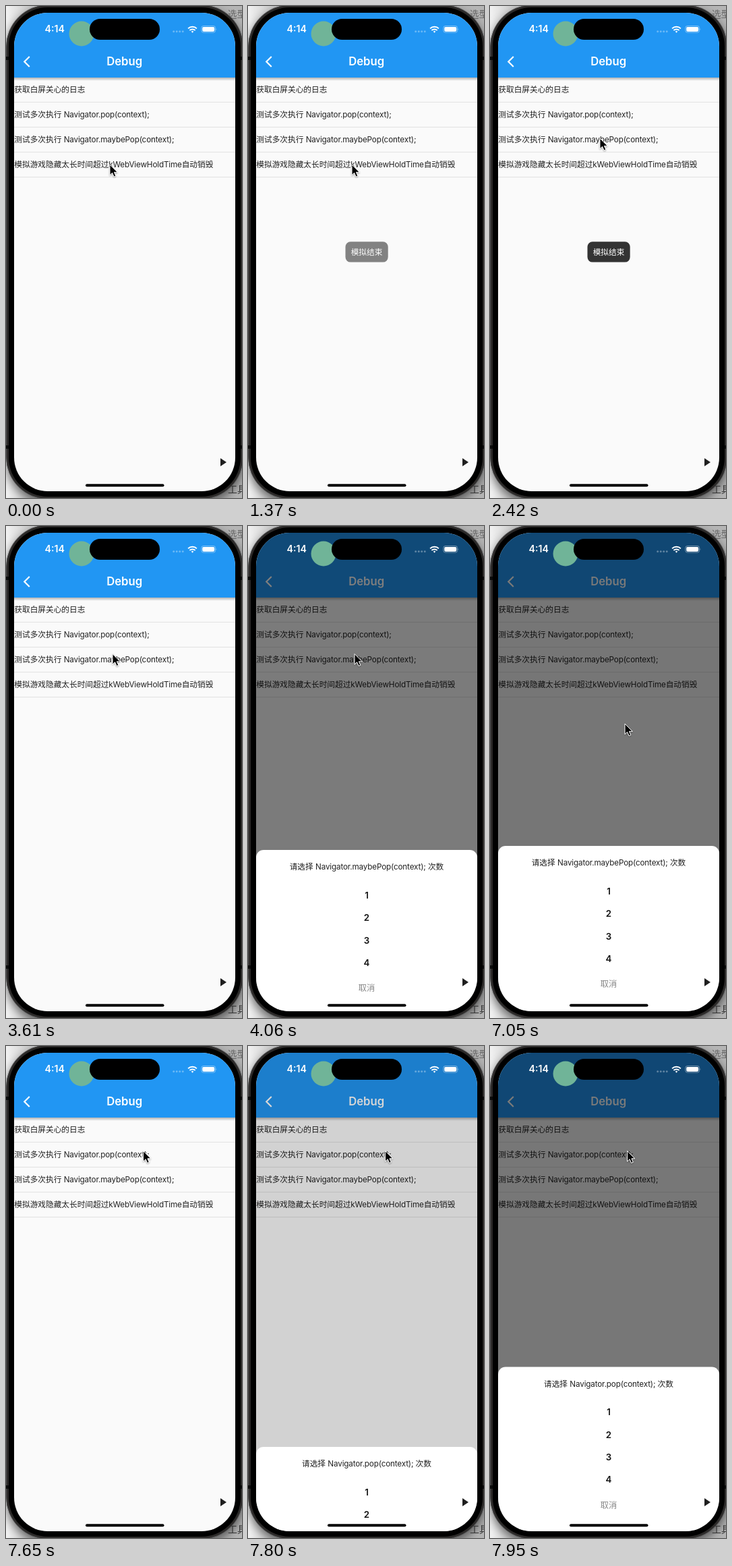
An HTML page for the animation above (8000 ms loop, 350 px wide and 729 px high).

```html
<!DOCTYPE html>
<html lang="zh-CN">
<head>
<meta charset="utf-8">
<title>Debug screen</title>
<style>
  html, body { margin: 0; width: 100%; height: 100%; overflow: hidden; background: #bbb; }
  svg { display: block; width: 350px; height: 729px; }
  text { font: 11.68px Inter, "Noto Sans CJK SC", "Noto Sans CJK", sans-serif; fill: #222; white-space: pre; }
  .latin { letter-spacing: -0.15px; }
  .mid { text-anchor: middle; }
  .title { font-size: 16.7px; font-weight: 600; fill: #fff; }
  .clock { font-size: 14.2px; font-weight: 600; fill: #fff; }
  .choice { font-size: 13.3px; font-weight: 600; fill: #111; }
  .cancel { font-size: 12.3px; fill: #888; }
</style>
</head>
<body>
<svg viewBox="0 0 350 729">
  <defs>
    <clipPath id="screen"><rect x="12" y="10" width="328" height="709" rx="50"/></clipPath>
    <linearGradient id="desk">
      <stop offset="0" stop-color="#f2f2f2"/>
      <stop offset=".12" stop-color="#c4c4c4"/>
      <stop offset="1" stop-color="#b4b4b4"/>
    </linearGradient>
    <linearGradient id="edge" x2="0" y2="1">
      <stop offset="0" stop-opacity=".28"/>
      <stop offset="1" stop-opacity="0"/>
    </linearGradient>
    <filter id="blur" x="-10%" y="-10%" width="120%" height="120%"><feGaussianBlur stdDeviation="7"/></filter>
    <filter id="soft" x="-50%" y="-50%" width="200%" height="200%">
      <feDropShadow dx="0" dy="1" stdDeviation=".8" flood-opacity=".4"/>
    </filter>
  </defs>

  <!-- desktop and phone body -->
  <rect width="350" height="729" fill="url(#desk)"/>
  <rect y="4" width="352" height="733" rx="62" opacity=".5" filter="url(#blur)"/>
  <text x="329" y="16.5" style="font-size:13.5px;fill:#666">选型</text>
  <text x="329" y="721" style="font-size:14px;fill:#333">工具</text>
  <rect x=".5" y="-1.5" width="351" height="732" rx="62" fill="#2c2a29" stroke="#4e4e4f"/>
  <path d="M0 77.500h4m344 0h4M0 653.500h4m344 0h4" stroke="#0b0b0b" stroke-width="5"/>
  <rect x="4" y="2" width="344" height="725" rx="58"/>

  <g clip-path="url(#screen)">
    <rect x="12" y="10" width="328" height="709" fill="#fafafa"/>
    <g id="rows"></g>
    <rect x="12" y="106" width="328" height="5" fill="url(#edge)"/>
    <rect x="12" y="10" width="328" height="96" fill="#2196f3"/>
    <path d="M34.800 75l-7.500 7.500 7.500 7.500" fill="none" stroke="#fff" stroke-width="2.200"/>
    <text class="title mid" x="175.700" y="88.300">Debug</text>
    <rect id="dim" x="12" y="10" width="328" height="709"/>
    <g id="sheet">
      <rect x="12" y="470" width="328" height="270" rx="11" fill="#fff"/>
      <text id="prompt" class="mid" x="176" y="499.400"></text>
      <g id="choices"></g>
      <text class="cancel mid" x="176" y="679">取消</text>
    </g>
    <g id="toast">
      <rect x="144.500" y="349.200" width="63.200" height="30.400" rx="7.500" fill="#333"/>
      <text class="mid" x="176" y="368.800" style="fill:#fff">模拟结束</text>
    </g>
  </g>

  <!-- status bar and floating controls -->
  <circle cx="112" cy="41" r="18.500" fill="#70b498"/>
  <rect x="124" y="19" width="104" height="31" rx="15.500"/>
  <text class="clock" x="57.500" y="39.300">4:14</text>
  <g id="signal" fill="#fff" opacity=".32"></g>
  <g fill="none" stroke="#fff" stroke-width="2">
    <path d="M270.100 33.400a9.200 9.200 0 0 1 12.800 0M272.400 36.100a5.900 5.900 0 0 1 8.200 0"/>
    <path d="M274.700 37.800a2.700 2.700 0 0 1 3.600 0l-1.800 2z" fill="#fff" stroke="none"/>
  </g>
  <rect x="289.800" y="29.500" width="20.800" height="9.800" rx="3" fill="none" stroke="#fff" stroke-opacity=".45" stroke-width=".9"/>
  <rect x="291.200" y="30.900" width="18" height="7" rx="1.800" fill="#fff"/>
  <path d="M311.600 32.900q1.400 1.500 0 3z" fill="#fff" opacity=".5"/>
  <path d="M318 670l9 6-9 6z" fill="#1f1f1f"/>
  <rect x="118" y="708.200" width="116.500" height="4" rx="2"/>
  <path id="cursor" d="M0 0v15.600l3.600-3.400 2.500 5.700 2.700-1.200-2.400-5.400h4.900z" stroke="#fff" stroke-width="1" filter="url(#soft)"/>
</svg>

<script>
const LOOP = 8000;
const $ = id => document.getElementById(id);
const mark = s => s.replace(/[\x21-\x7e]+/g, '<tspan class="latin">$&</tspan>');

$('rows').innerHTML = [
  '获取白屏关心的日志',
  '测试多次执行 Navigator.pop(context);',
  '测试多次执行 Navigator.maybePop(context);',
  '模拟游戏隐藏太长时间超过kWebViewHoldTime自动销毁'
].map((s, i) => `<text x="12.300" y="${128.3 + 37 * i}">${mark(s)}</text>
  <path d="M12 ${142.5 + 37 * i}h328" stroke="#e2e2e2"/>`).join('');

$('choices').innerHTML = [1, 2, 3, 4].map((n, i) =>
  `<text class="choice mid" x="176" y="${541.9 + 33.3 * i}">${n}</text>`).join('');

$('signal').innerHTML = [0, 1, 2, 3].map(i =>
  `<circle cx="${248.7 + 4.5 * i}" cy="37.700" r="1.500"/>`).join('');

// [time, x, y]
const cursor = [
  [0, 154, 235], [1820, 154, 232], [1970, 156, 222], [2120, 159, 209],
  [2270, 162, 199], [2420, 163, 196], [2870, 162, 188], [3020, 159, 174],
  [3170, 156, 166], [3320, 155, 171], [3470, 156, 182], [3610, 158, 189.500],
  [5860, 163, 453.500], [6010, 166, 471], [6160, 175, 452], [6310, 187, 390],
  [6460, 197, 322], [6610, 200, 293], [7200, 200, 284], [7350, 201, 232],
  [7500, 203, 172], [7650, 203.500, 155.500]
];
// [time, drop below the open position, barrier opacity]
const sheet = [
  [0, 250, 0], [4060, 10, .505], [4210, 0, .54], [7050, 4, .524],
  [7200, 189, .03], [7350, 250, 0], [7800, 124, .16], [7950, 5.500, .52]
];
// [time, opacity]
const toast = [[0, 0], [1370, .6], [1520, 1], [2570, .5], [2720, 0]];

const at = (steps, t) => steps.findLast(s => s[0] <= t);
const shift = (id, x, y) => $(id).setAttribute('transform', `translate(${x} ${y})`);

let call = '';
function setCall(name) {
  if (name === call) return;
  call = name;
  $('prompt').innerHTML = mark(`请选择 Navigator.${name}(context); 次数`);
}

function draw(t) {
  const [, x, y] = at(cursor, t);
  const [, drop, shade] = at(sheet, t);
  shift('cursor', x, y);
  shift('sheet', 0, drop);
  $('dim').setAttribute('opacity', shade);
  $('toast').setAttribute('opacity', at(toast, t)[1]);
  setCall(t < 7500 ? 'maybePop' : 'pop');
}

const start = performance.now();
function tick() {
  draw((performance.now() - start) % LOOP);
  requestAnimationFrame(tick);
}
tick();
</script>
</body>
</html>
```
